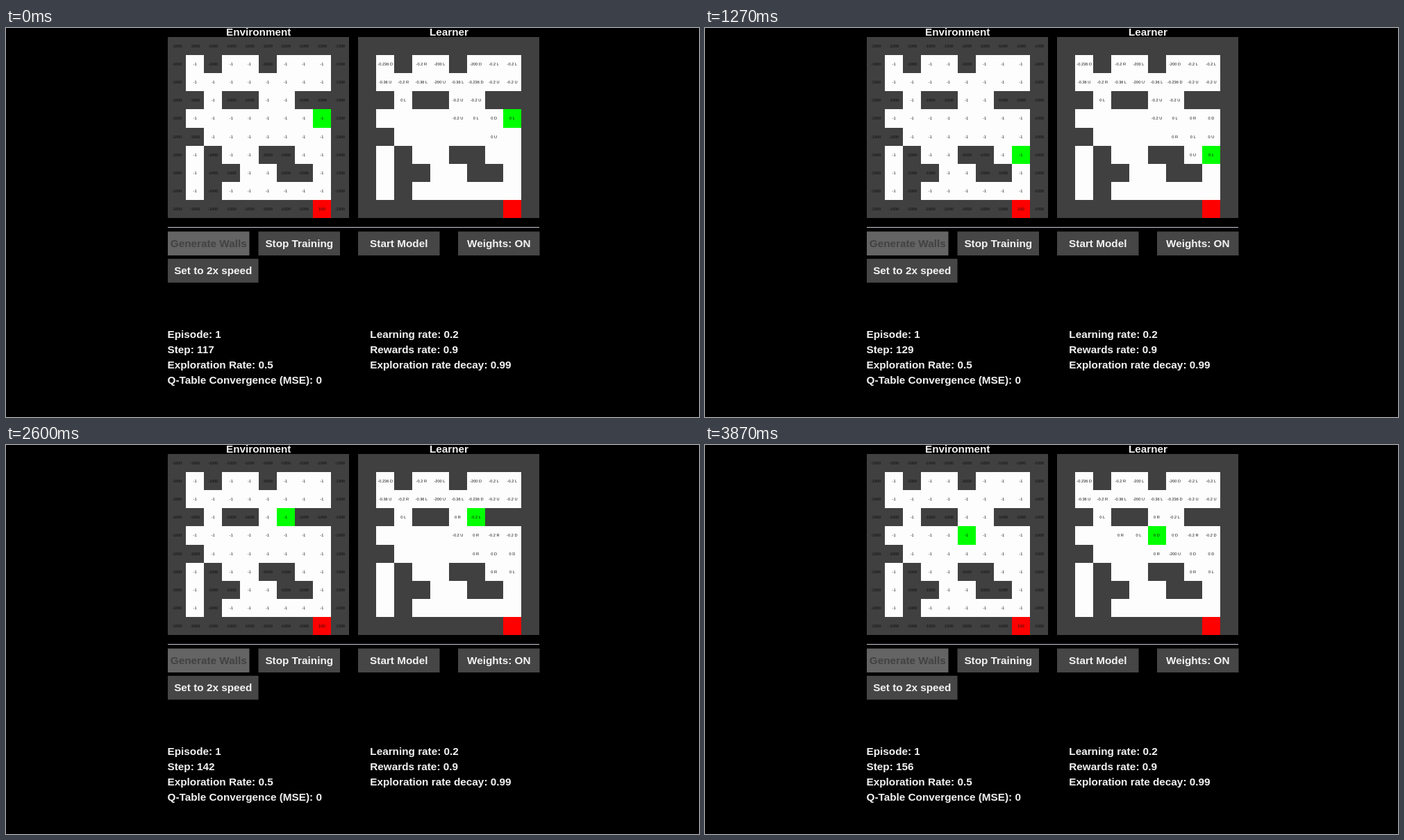
An HTML page with a canvas that plays this animation: 998x561 px, repeating every 3.94 s.

```html
<!DOCTYPE html>
<html lang="en">
<head>
<meta charset="utf-8">
<title>Grid world training</title>
<style>
html, body { margin: 0; width: 998px; height: 561px; overflow: hidden; background: #000; }
canvas { display: block; }
</style>
</head>
<body>
<canvas id="stage" width="998" height="561"></canvas>
<script>
const ctx = document.getElementById('stage').getContext('2d');
const LOOP = 3940, FIRST = 117, CELL = 26.1, TOP = 13;
const ENV_X = 233, LEARN_X = 507;
const FONT = '"Liberation Sans", Arial, sans-serif';
const WALL = '#404040', BUTTON = '#464646', WHITE = '#fdfdfd';

const MAZE = [
  '##########',
  '#.#..#...#',
  '#........#',
  '##.##..###',
  '#........#',
  '##.......#',
  '#.#..##..#',
  '##'.replace('##', '#.') + '##..##.#',
  '#.#......#',
  '########G#'
];

// One letter per step; a dot is a bump into a wall.
const MOVES = 'LDURD' + 'LLRDURD' + 'LRULRU.L' + 'LUL.R' + 'DLLL' + 'RRRD.LR.UL';
const DIRS = { U: [0, -1], D: [0, 1], L: [-1, 0], R: [1, 0], '.': [0, 0] };

// Time in ms and the step progress reached by then.
const PACE = [[0, 117.4], [600, 122.5], [1270, 129.4], [2070, 137.5],
  [2600, 142.4], [3000, 146.5], [3870, 156.1], [LOOP, 156.9]];

// Best action per cell at the start, rows 1 to 5, columns 1 to 8.
const START = [
  '-0.236 D,,-0.2 R,-200 L,,-200 D,-0.2 L,-0.2 L',
  '-0.36 U,-0.2 R,-0.36 L,-200 U,-0.36 L,-0.236 D,-0.2 U,-0.2 U',
  ',0 L,,,-0.2 U,-0.2 U,,',
  ',,,,-0.2 U,0 L,0 D,0 L',
  ',,,,,,0 U,'
].map(row => row.split(','));

// step: column,row=label
const UPDATES = {
  118: '8,4=0 D', 119: '7,4=0 R', 120: '7,5=-0.2 U', 122: '8,5=0 L',
  123: '8,5=0 U', 124: '7,5=0 L;6,5=0 R', 126: '7,6=0 U', 129: '8,6=0 L',
  131: '7,6=0 R', 133: '8,5=0 D', 134: '7,5=0 D', 136: '8,4=-0.2 D',
  137: '7,4=-0.2 R', 139: '6,4=0 R', 140: '6,3=-0.2 L', 141: '5,3=0 R',
  144: '6,4=0 U', 145: '5,4=0 R;4,4=0 R', 146: '3,4=0 R', 148: '4,4=0 L',
  149: '5,4=0 D', 150: '6,4=0 D', 151: '6,5=-200 U', 152: '5,5=0 R'
};

function stepAt(t) {
  const i = Math.max(1, PACE.findIndex(p => p[0] > t));
  const [t0, s0] = PACE[i - 1], [t1, s1] = PACE[i];
  return Math.floor(s0 + (s1 - s0) * (t - t0) / (t1 - t0));
}

function agentAt(step) {
  let x = 8, y = 4;
  for (const m of MOVES.slice(0, step - FIRST)) {
    x += DIRS[m][0];
    y += DIRS[m][1];
  }
  return [x, y];
}

function labelsAt(step) {
  const labels = {};
  START.forEach((row, r) => row.forEach((s, c) => { labels[[c + 1, r + 1]] = s; }));
  for (let s = FIRST; s <= step; s++) {
    for (const part of (UPDATES[s] || '').split(';')) {
      const [key, value] = part.split('=');
      if (value) labels[key] = value;
    }
  }
  return labels;
}

function text(str, x, y, color = '#f2f2f2', align = 'left', font = 'bold 15.3px ') {
  ctx.font = font + FONT;
  ctx.fillStyle = color;
  ctx.textAlign = align;
  ctx.fillText(str, x, y);
}

function rect(color, x, y, w, h) {
  ctx.fillStyle = color;
  ctx.fillRect(x, y, w, h);
}

function button(label, x, y, w, fill = BUTTON, color) {
  rect(fill, x, y, w, 34.5);
  text(label, x + w / 2, y + 22.5, color, 'center');
}

function board(x0, agent, labelOf) {
  const edge = (o, i) => Math.round(o + i * CELL);
  MAZE.forEach((row, r) => [...row].forEach((kind, c) => {
    const here = c === agent[0] && r === agent[1];
    const fill = here ? '#00ff00' : kind === 'G' ? '#ff0000' : kind === '#' ? WALL : WHITE;
    const x = edge(x0, c), y = edge(TOP, r);
    rect(fill, x, y, edge(x0, c + 1) - x, edge(TOP, r + 1) - y);
    const label = labelOf(c, r, kind);
    if (label) {
      text(label, x0 + (c + 0.5) * CELL, TOP + (r + 0.5) * CELL + 2,
        kind === '#' ? '#0c0c0c' : '#141414', 'center', '5.7px ');
    }
  }));
}

function draw(t) {
  const step = stepAt(t), agent = agentAt(step), labels = labelsAt(step);
  const rewards = { '#': '-1000', '.': '-1', G: '100' };
  rect('#000', 0, 0, 998, 561);

  text('Environment', 363.7, 11.3, undefined, 'center');
  text('Learner', 638, 11.3, undefined, 'center');
  board(ENV_X, agent, (c, r, kind) => rewards[kind]);
  board(LEARN_X, agent, (c, r) => labels[[c, r]]);

  rect('#c8c8d4', 233, 287, 535, 1);
  button('Generate Walls', 233, 293.5, 117.5, '#646464', '#424242');
  button('Stop Training', 363.5, 293.5, 117.5);
  button('Start Model', 507, 293.5, 117.5);
  button('Weights: ON', 651, 293.5, 117.5);
  button('Set to 2x speed', 233, 332.8, 130.5);

  ['Episode: 1', 'Step: ' + step, 'Exploration Rate: 0.5', 'Q-Table Convergence (MSE): 0']
    .forEach((s, i) => text(s, 232.5, 447.2 + i * 21.8));
  ['Learning rate: 0.2', 'Rewards rate: 0.9', 'Exploration rate decay: 0.99']
    .forEach((s, i) => text(s, 524.3, 447.2 + i * 21.8));
}

const begin = performance.now();
function tick() {
  draw((performance.now() - begin) % LOOP);
  requestAnimationFrame(tick);
}
tick();
</script>
</body>
</html>
```
